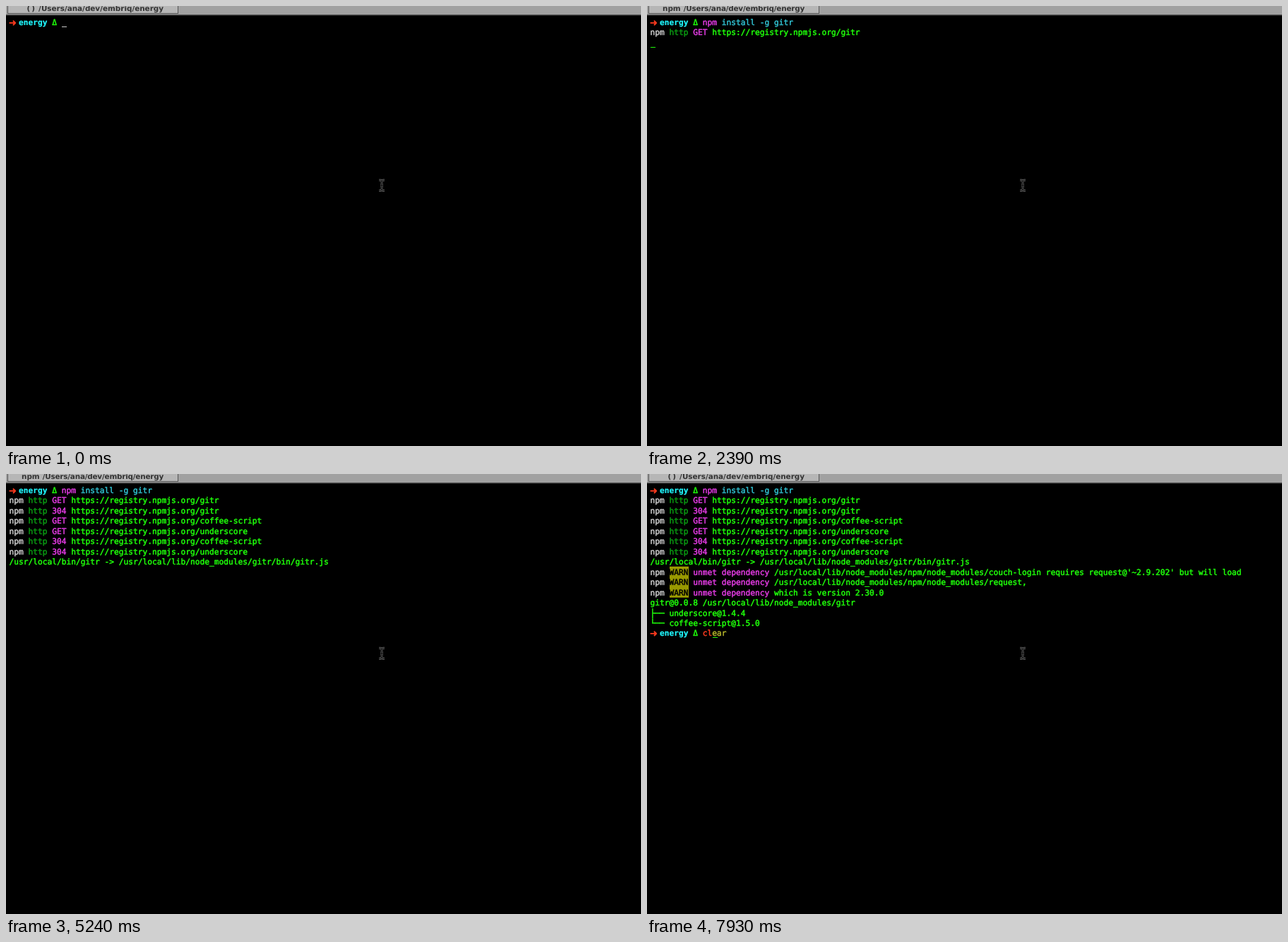
An HTML page with a canvas for the animation above (8000 ms loop, 899x623 px).

```html
<!DOCTYPE html>
<html lang="en">
<head>
<meta charset="utf-8">
<title>Terminal session</title>
<style>
  html, body { margin: 0; width: 100%; height: 100%; overflow: hidden; background: #000; }
  canvas { display: block; }
</style>
</head>
<body>
<canvas width="899" height="623"></canvas>
<script>
const ctx = document.querySelector('canvas').getContext('2d');
const LOOP = 8000;
const CELL = 6.75, LINE = 14.46, LEFT = 5, TOP = 15.8;
const MONO = '11.2px "DejaVu Sans Mono", monospace';
const GREEN = '#1fff0a', DARK_GREEN = '#0a9a12', MAGENTA = '#e03ae0', CYAN = '#30c0d0',
  AQUA = '#1ff5fb', RED = '#ff3b1f', OLIVE = '#b0b02a', WHITE = '#cbcbcb', WARN_BG = '#999900';

// A line is a list of segments: [text, colour, style].
const prompt = [['➜', RED, 'arrow'], [' ', RED], ['energy', AQUA, 'bold'], [' Δ ', GREEN]];
const PROMPT_COLS = 11;
const http = (status, name) => [['npm ', WHITE], ['http ', DARK_GREEN], [status + ' ', MAGENTA],
  ['https://registry.npmjs.org/' + name, GREEN]];
const warn = text => [['npm ', WHITE], ['WARN', '#000', 'warn'], [' unmet dependency ', MAGENTA], [text, GREEN]];
const plain = text => [[text, GREEN]];

const output = [
  http('GET', 'gitr'),
  http('304', 'gitr'),
  http('GET', 'coffee-script'),
  http('GET', 'underscore'),
  http('304', 'coffee-script'),
  http('304', 'underscore'),
  plain('/usr/local/bin/gitr -> /usr/local/lib/node_modules/gitr/bin/gitr.js'),
  warn("/usr/local/lib/node_modules/npm/node_modules/couch-login requires request@'~2.9.202' but will load"),
  warn('/usr/local/lib/node_modules/npm/node_modules/request,'),
  warn('which is version 2.30.0'),
  plain('gitr@0.0.8 /usr/local/lib/node_modules/gitr'),
  plain('├── underscore@1.4.4'),
  plain('└── coffee-script@1.5.0'),
];
// [start time, number of output lines shown]
const outputSteps = [[0, 0], [2390, 1], [3290, 4], [3740, 6], [3890, 7], [5390, 13]];

// [start time, typed segments]
const installSteps = [
  [0, []],
  [150, [['n', RED], ['pm install -g gitr', OLIVE]]],
  [290, [['npm', MAGENTA], [' install -g gitr', OLIVE]]],
  [890, [['npm', MAGENTA], [' install -g gitr', CYAN]]],
];
const clearSteps = [
  [0, []],
  [7780, [['c', RED], ['lear', OLIVE]]],
  [7930, [['cl', RED], ['ear', OLIVE]]],
];

// [start time, cursors as [row, column, colour]]
const cursorSteps = [
  [0, [[0, 11, WHITE]]],
  [150, [[0, 12, GREEN]]],
  [290, [[0, 14, GREEN]]],
  [890, [[0, 14, GREEN], [0, 30, WHITE]]],
  [1040, [[0, 30, WHITE]]],
  [2090, []],
  [2240, [[1, 0, GREEN]]],
  [2390, [[2, 0, GREEN]]],
  [3290, [[5, 0, GREEN]]],
  [3740, [[7, 0, GREEN]]],
  [3890, [[8, 0, GREEN]]],
  [5240, []],
  [5390, [[14, 11, WHITE]]],
  [6280, []],
  [6730, [[14, 11, WHITE]]],
  [7180, []],
  [7780, [[14, 12, GREEN]]],
  [7930, [[14, 13, GREEN]]],
];

const at = (steps, t) => steps.filter(([start]) => start <= t).pop()[1];

function rect(x, y, w, h, colour) {
  ctx.fillStyle = colour;
  ctx.fillRect(x, y, w, h);
}

// The thin outline gives the text its heavier, smoothed weight.
function drawChar(char, x, y) {
  ctx.fillText(char, x, y);
  ctx.strokeText(char, x, y);
}

function drawLine(row, segments, col = 0) {
  const top = TOP + row * LINE, baseline = Math.round(top + 11.2);
  for (const [text, colour, style] of segments) {
    const x = LEFT + col * CELL;
    if (style === 'warn') rect(x, Math.round(top), text.length * CELL, 15, WARN_BG);
    ctx.fillStyle = ctx.strokeStyle = colour;
    ctx.lineWidth = style === 'bold' ? 0.2 : 0.5;
    if (style === 'arrow') {
      ctx.font = 'bold 13px "DejaVu Sans", sans-serif';
      drawChar(text, x - 1, baseline + 1);
    } else {
      ctx.font = (style === 'bold' ? 'bold ' : '') + MONO;
      [...text].forEach((char, i) => drawChar(char, x - 0.5 + i * CELL, baseline));
    }
    col += text.length;
  }
}

function drawTitleBar(running) {
  rect(0, 0, 899, 12, '#a1a1a1');
  rect(0, 12, 899, 1, '#555');
  rect(0, 13, 899, 1, '#222');
  rect(2, 0, 242, 11, '#555');
  rect(3, 0, 240, 10, '#b6b6b6');
  ctx.font = 'bold 10.4px "DejaVu Sans", sans-serif';
  ctx.fillStyle = '#333';
  ctx.letterSpacing = running ? '0px' : '2px';
  ctx.fillText(running ? 'npm' : '()', running ? 22 : 29.5, 7);
  ctx.letterSpacing = running ? '-0.2px' : '0px';
  ctx.textAlign = 'right';
  ctx.fillText('/Users/ana/dev/embriq/energy', 223, 7);
  ctx.textAlign = 'left';
  ctx.letterSpacing = '0px';
}

function drawPointer() {
  const beam = new Path2D('M528 246.5h2.5l1.5 1.5l1.5-1.5h2.5M532 248v12M528 261.5h2.5l1.5-1.5l1.5 1.5h2.5M530 254h4');
  for (const [width, colour] of [[2.8, '#606060'], [1, '#000']]) {
    ctx.lineWidth = width;
    ctx.strokeStyle = colour;
    ctx.stroke(beam);
  }
}

function draw(t) {
  rect(0, 0, 899, 623, '#000');
  drawTitleBar(t >= 2090 && t < 5390);
  drawLine(0, prompt);
  drawLine(0, at(installSteps, t), PROMPT_COLS);
  output.slice(0, at(outputSteps, t)).forEach((line, i) => drawLine(i + 1, line));
  if (t >= 5390) {
    drawLine(14, prompt);
    drawLine(14, at(clearSteps, t), PROMPT_COLS);
  }
  for (const [row, col, colour] of at(cursorSteps, t))
    rect(Math.round(LEFT + col * CELL), Math.round(TOP + row * LINE) + 13, 7, 1, colour);
  drawPointer();
}

ctx.textRendering = 'geometricPrecision';
ctx.lineJoin = 'round';
const start = performance.now();
function tick() {
  draw((performance.now() - start) % LOOP);
  requestAnimationFrame(tick);
}
tick();
</script>
</body>
</html>
```
